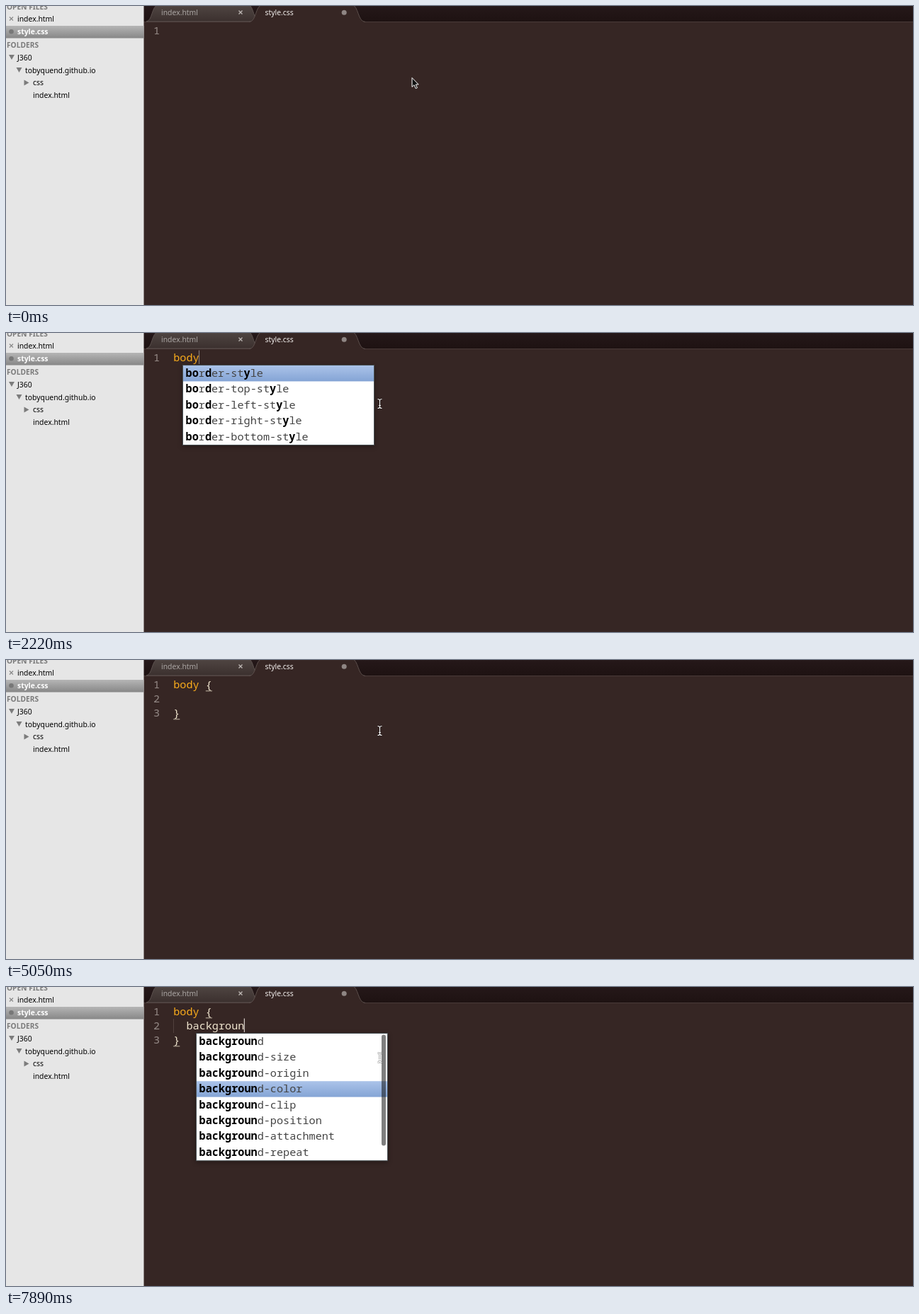
These frames come from a looping animation (1280 px wide and 423 px high, 8 s). An HTML page:

```html
<!DOCTYPE html>
<html lang="en">
<head>
<meta charset="utf-8">
<title>Typing CSS in a code editor</title>
<style>
  html, body { margin: 0; width: 100%; height: 100%; overflow: hidden; background: #362624; }
  svg { display: block; width: 1280px; height: 423px; }
  text { white-space: pre; }
  .ui { font: 500 10.4px "Noto Sans", "Open Sans", sans-serif; }
  .chosen { font-weight: 600; fill: #fff; }
  .head { font: 700 10.2px "Noto Sans", "Open Sans", sans-serif; fill: #7b7b7b; }
  .code { font: 15.2px "Noto Sans Mono", "DejaVu Sans Mono", monospace; }
  .menu { filter: drop-shadow(0 2px 3px rgba(0, 0, 0, .35)); }
  .hit { font-weight: 700; fill: #000; }
</style>
</head>
<body>
<svg viewBox="0 0 1280 423">
  <defs>
    <linearGradient id="bar" x2="0" y2="1">
      <stop stop-color="#251819"/><stop offset="1" stop-color="#1e1212"/>
    </linearGradient>
    <linearGradient id="tab" x2="0" y2="1">
      <stop stop-color="#504643"/><stop offset="1" stop-color="#3b302e"/>
    </linearGradient>
    <linearGradient id="row" x2="0" y2="1">
      <stop stop-color="#b5b5b5"/><stop offset="1" stop-color="#878787"/>
    </linearGradient>
    <linearGradient id="pick" x2="0" y2="1">
      <stop stop-color="#abc3e9"/><stop offset="1" stop-color="#84a4d5"/>
    </linearGradient>
  </defs>

  <rect width="1280" height="423" fill="#362624"/>
  <rect x="194" width="1086" height="22" fill="url(#bar)"/>
  <path d="M194 22.5H1280" stroke="#4b3c3a"/>
  <path d="M198 22C207 21 205 0 215 -2H342C350 0 349 21 358 22Z" fill="url(#tab)" stroke="#5c514e"/>
  <path d="M343 23C354 22 351 0 362 -2H488C498 0 496 22 507 23Z" fill="#362624"/>
  <path d="M343 22.5C354 22 351 0 362 -2M488 -2C498 0 496 22 507 22.5" fill="none" stroke="#5c4f4c"/>
  <g class="ui">
    <text x="219" y="13" fill="#aaa5a3">index.html</text>
    <text x="365.5" y="13" fill="#f2efed">style.css</text>
  </g>
  <path d="M328.5 6.500l5 5m0-5l-5 5" stroke="#bbb5b2" stroke-width="1.400"/>
  <circle cx="477.2" cy="9.200" r="3.500" fill="#8f8684"/>

  <rect width="194.500" height="423" fill="#e6e6e6"/>
  <rect y="28" width="194.500" height="17.500" fill="url(#row)"/>
  <text class="head" x="1" y="5">OPEN FILES</text>
  <text class="head" x="1" y="58.500">FOLDERS</text>
  <g class="ui">
    <text x="16" y="21.800">index.html</text>
    <text class="chosen" x="16" y="39.800">style.css</text>
    <text x="16" y="76.500">J360</text>
    <text x="27" y="94.500">tobyquend.github.io</text>
    <text x="38" y="112">css</text>
    <text x="38" y="129.500">index.html</text>
  </g>
  <path d="M5 15.500l5 5m0-5l-5 5" stroke="#8a8a8a" stroke-width="1.300"/>
  <circle cx="7.500" cy="36.300" r="3.300" fill="#777"/>
  <path d="M4 69h8l-4 7zM14.500 87h8l-4 7zM25.500 104.500v8l7-4z" fill="#7c7c7c"/>

  <g id="editor" class="code"></g>
  <g id="pointer"></g>
</svg>
<script>
const LOOP = 8000, CHAR = 9.12, LEFT = 236.2, TOP = 24, LINE = 20, ROW = 22.4;
const editor = document.getElementById('editor');
const pointer = document.getElementById('pointer');

const withPrefix = (prefix, words) => words.split(' ').map(word => prefix + word);

// An entry is a label, or a label and its expansion.
const lists = {
  short: [['b', 'bottom'], 'background', 'bottom', 'border', ['bxz', 'box-sizing: ${1:bor…box};'],
    ['bxsh', 'box-shadow: ${1:inset }…'], ['bfv', 'backface-visibility'], ['bd', 'border']],
  border: ['box-decoration-break', 'border',
    ...withPrefix('border-', 'top left radius bottom spacing image')],
  style: withPrefix('border-', 'style top-style left-style right-style bottom-style'),
  background: ['background',
    ...withPrefix('background-', 'size origin color clip position attachment repeat')]
};

const menu = (list, query, pick, x, y, thumb = 0) => ({ list, query, pick, x, y, thumb });
const tagMenu = (list, query, thumb) => menu(list, query, 0, 249, 45, thumb);
const ruleMenu = (list, query, thumb) => menu(list, query, 3, 268, 65, thumb);

const typed = (lines, row, col, popup = null) =>
  ({ lines, row, col, menu: popup, caret: 1, thumb: 1 });
const rule = (word, popup) =>
  typed(['body {', word && '  ' + word, '}'], 1, word.length + 2, popup);
const property = word => rule(word, ruleMenu('background', word, 157));
const dim = { caret: 0.45 }, off = { caret: 0 }, on = { caret: 1 };

// Each step overrides part of the state before it.
const steps = [
  [0, { ...typed([''], 0, 0), caret: 0, arrow: true, mouse: [572.5, 101] }],
  [300, { arrow: false, mouse: [557, 101] }],
  [450, { mouse: [538, 100.5] }],
  [600, { mouse: [529, 100], ...dim }],
  [750, { mouse: [527.5, 100], ...on }],
  [1040, dim], [1190, off],
  [1630, typed(['b'], 0, 1)],
  [1780, typed(['bod'], 0, 3, tagMenu('border', 'bod', 34))],
  [1920, typed(['body'], 0, 4, tagMenu('style', 'body'))],
  [2220, dim],
  [2370, typed(['body '], 0, 5)],
  [2670, typed(['body {}'], 0, 6)],
  [2970, dim], [3120, off], [3710, on], [4000, dim], [4150, off],
  [4450, rule('')],
  [4750, { caret: 0.7 }], [4900, { caret: 0.3 }], [5050, off],
  [5200, rule('ba', ruleMenu('short', 'b'))],
  [5350, property('bac')],
  [5500, property('back')],
  [5800, property('backg')],
  [6100, { ...dim, thumb: 0.75 }], [6250, { ...off, thumb: 0.4 }], [6390, { thumb: 0 }],
  [6690, dim], [6840, on], [7140, dim], [7290, off],
  [7590, property('backgr')],
  [7740, property('backgro')],
  [7890, property('backgroun')]
];
let last = {};
const states = steps.map(([, change]) => last = { ...last, ...change });

const rect = (x, y, w, h, fill, extra = '') =>
  `<rect x="${x}" y="${y}" width="${w}" height="${h}" fill="${fill}" ${extra}/>`;
const text = (x, y, fill, content, extra = '') =>
  `<text x="${x}" y="${y}" fill="${fill}" ${extra}>${content}</text>`;

// Bolds the query's letters in the order they occur.
function emphasise(label, query) {
  let next = 0;
  return [...label].map(letter => {
    if (letter !== query[next]) return letter;
    next++;
    return `<tspan class="hit">${letter}</tspan>`;
  }).join('');
}

function drawLine(line, row) {
  const y = TOP + row * LINE;
  const colored = line.replace(/^body/, '<tspan fill="#f8ab1c">body</tspan>');
  let out = text(208, y + 15.6, '#958a87', row + 1) + text(LEFT, y + 15.6, '#f0e5cf', colored);
  if (line.startsWith('  ')) out += rect(236, y + 1, 1, LINE, '#51413e');
  [...line].forEach((letter, col) => {
    if ('{}'.includes(letter)) out += rect(LEFT + col * CHAR, y + 19.3, CHAR, 1, '#c5b9a7');
  });
  return out;
}

function drawMenu({ list, query, pick, x, y, thumb }, thumbAlpha) {
  const entries = lists[list], height = entries.length * ROW;
  let out = rect(x, y, 271, height + 2, '#4b5357', 'class="menu"') +
    rect(x + 1, y + 1, 269, height, '#fff') +
    rect(x + 1, y + 1 + pick * ROW, 269, ROW, 'url(#pick)');
  entries.forEach((entry, i) => {
    const [label, hint] = [].concat(entry), base = y + 17 + i * ROW;
    out += text(x + 4.5, base, '#444', emphasise(label, query));
    if (hint) out += text(x + 265, base, '#444', hint, 'text-anchor="end"');
  });
  if (thumb) {
    out += rect(x + 262, y + 2.5, 6, thumb, '#000', `rx="3" fill-opacity="${thumbAlpha / 2}"`);
  }
  return out;
}

function drawPointer({ arrow, mouse }) {
  const beam = 'M-3-6.500Q0-6.500 0-4.500Q0-6.500 3-6.500M0-4.500V4.500' +
    'M-3 6.500Q0 6.500 0 4.500Q0 6.500 3 6.500M-1.500 2.500h3';
  const stroke = (color, width) =>
    `<path d="${beam}" fill="none" stroke="${color}" stroke-width="${width}"/>`;
  const shape = arrow
    ? '<path d="M.5 .5V13.500l3-2.800 2.200 5 2.200-1-2.200-4.700h4z" fill="#111" stroke="#fff"/>'
    : stroke('rgba(0,0,0,.4)', 2.5) + stroke('#fff', 1.1);
  return `<g transform="translate(${mouse})">${shape}</g>`;
}

let shown = -1;
function frame() {
  const time = performance.now() % LOOP;
  const index = steps.findLastIndex(([start]) => start <= time);
  if (index !== shown) {
    const state = states[shown = index];
    const caret = rect(LEFT - 0.7 + state.col * CHAR, TOP + 0.5 + state.row * LINE, 1, 19.5,
      '#f4efe8', `fill-opacity="${state.caret}"`);
    editor.innerHTML = state.lines.map(drawLine).join('') + caret +
      (state.menu ? drawMenu(state.menu, state.thumb) : '');
    pointer.innerHTML = drawPointer(state);
  }
  requestAnimationFrame(frame);
}
frame();
</script>
</body>
</html>
```
